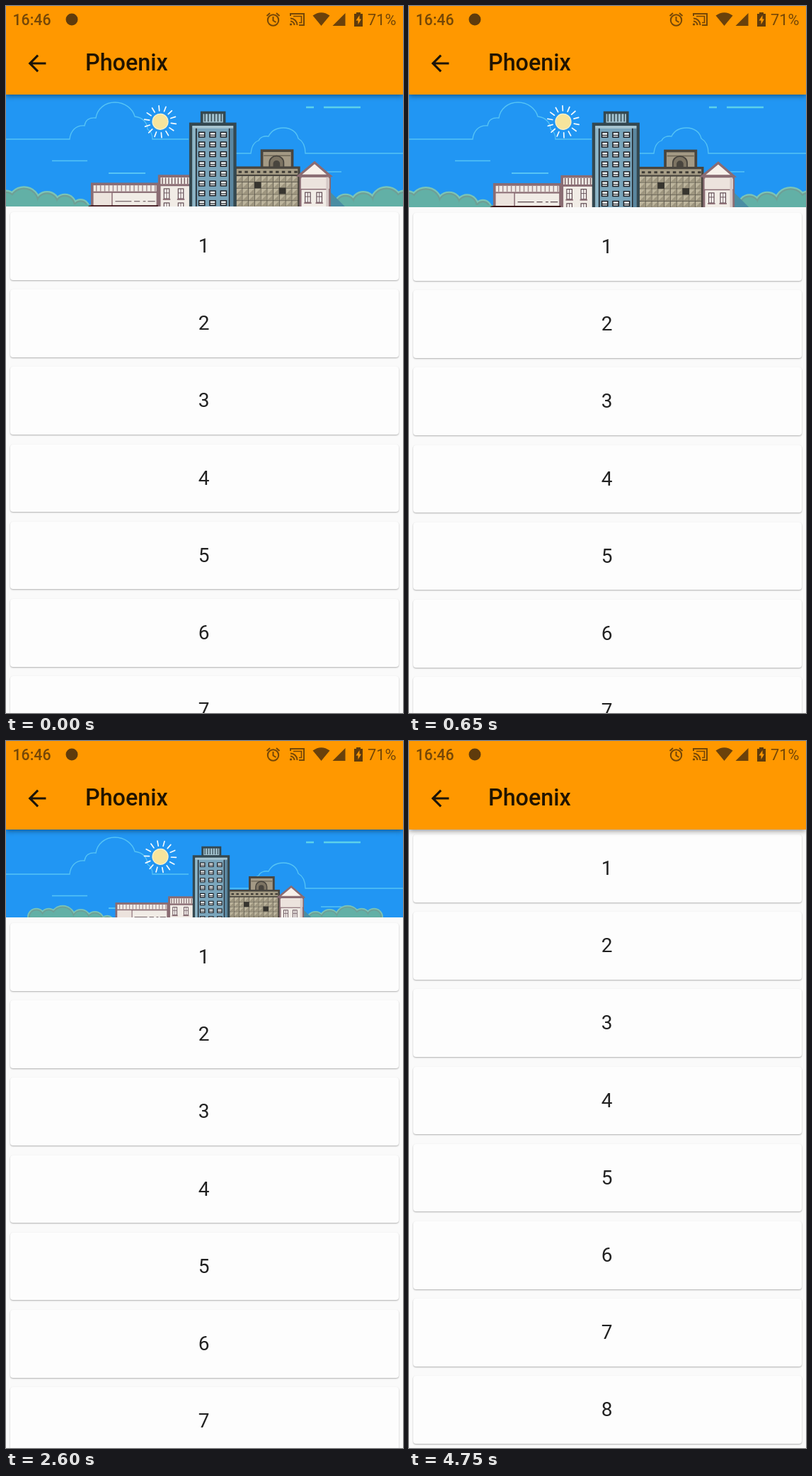
An HTML page for the animation above (5.7 s loop, 561 by 998 pixels).

```html
<!DOCTYPE html>
<html lang="en">
<head>
<meta charset="utf-8">
<title>Pull to refresh</title>
<style>
  html, body { margin: 0; width: 100%; height: 100%; overflow: hidden; background: #fafafa; }
  #stage { position: relative; width: 561px; height: 998px; overflow: hidden;
    font-family: Roboto, "Noto Sans", sans-serif; }
  #stage > * { position: absolute; left: 0; top: 0; }
  svg { display: block; }
  #list { top: 124px; width: 561px; height: 1000px; background: #fafafa; }
  .card { position: absolute; left: 6px; width: 549px; height: 95.5px; border-radius: 4px;
    background: #fdfdfd; box-shadow: 0 1px 2px rgba(0, 0, 0, .3);
    font-size: 28px; line-height: 95.5px; text-align: center; text-indent: -2px;
    color: rgba(0, 0, 0, .87); }
  #bar { width: 561px; height: 124.5px; background: #ff9800; box-shadow: 0 2px 7px rgba(0, 0, 0, .42); }
</style>
</head>
<body>
<div id="stage">
  <svg id="scene" width="561" height="400" viewBox="0 0 561 400">
    <rect width="561" height="400" fill="#2196f3"/>
    <g fill="none" stroke="#56c4f5" stroke-width="1.3">
      <path d="M0 188H90C91 177 98 168 111 169C112 161 118 157 127 158C129 145 140 136 154 136C168 136 179 145 182 156C193 157 200 165 200 174C205 177 207 182 207 188H258"/>
      <path d="M300 208H346C347 199 350 192 357 190C359 185 365 183 371 184C375 176 383 172 392 172C403 172 411 178 413 187C420 191 423 199 423 208H561"/>
      <path d="M65 218.5H115M320 229H356M445 234H474"/>
      <path d="M145 236H197" stroke-width="2"/>
      <path d="M424 143H435M449 143H501" stroke="#5cd0ea" stroke-width="2.4"/>
    </g>
    <g id="sun"></g>
    <g id="town"></g>
  </svg>
  <div id="list"></div>
  <div id="bar">
    <svg width="561" height="124" viewBox="0 0 561 124">
      <g fill="#754707">
        <text x="9.5" y="27" font-size="21.3" font-weight="500">16:46</text>
        <text x="511" y="27" font-size="21.8">71%</text>
        <circle cx="93" cy="19" r="8.5" fill="#5f3b0c"/>
        <path d="M445.500 28L433.500 13.500Q445.500 5 457.500 13.500Z" fill="#6a410b"/>
        <path d="M479.500 10V28H461.500Z" fill="#6a410b"/>
        <path d="M495 11V9H501V11H504V29H492V11Z" fill="#5f3b0c"/>
        <path d="M499.500 13L494.500 20.500H497.500V26L502 18.500H499.500Z" fill="#ff9800"/>
      </g>
      <g fill="none" stroke="#754707" stroke-width="2">
        <circle cx="377.500" cy="20" r="7.700"/>
        <path d="M377.500 15V20.500L381.500 23M368.500 14L373 10M386.500 14L382 10"/>
        <path d="M402 14V11H421V27H414M402 17.500A9.500 9.500 0 0 1 411.500 27M402 21.500A5.500 5.500 0 0 1 407.500 27"/>
        <path d="M406 14.500H417.500V23.500H414" stroke-width="1.600"/>
        <path d="M401 26H404" stroke-width="2.600"/>
      </g>
      <path transform="translate(25.300 62.300) scale(1.558)" fill="#1c1408"
        d="M20 11H7.830l5.590-5.590L12 4l-8 8 8 8 1.410-1.410L7.830 13H20z"/>
      <text x="112" y="91" font-size="32.300" font-weight="500" fill="rgba(0,0,0,.87)">Phoenix</text>
    </svg>
  </div>
</div>
<script>
const LOOP = 5700, STEP = 50, REST = 125;
const $ = id => document.getElementById(id);
const times = (n, fn) => Array.from({ length: n }, (_, i) => fn(i)).join('');
const rect = (x, y, w, h, fill, stroke = 'none', sw = 0) =>
  `<rect x="${x}" y="${y}" width="${w}" height="${h}" fill="${fill}" stroke="${stroke}" stroke-width="${sw}"/>`;
const path = (d, fill, stroke = 'none', sw = 0) =>
  `<path d="${d}" fill="${fill}" stroke="${stroke}" stroke-width="${sw}"/>`;

const MAUVE = '#8a6c73', CREAM = '#f1ece6', SLATE = '#344850', OLIVE = '#49453e', INK = '#1c1d22';

function bushes() {
  // x, y, radius for the left side; the right side is its mirror
  const balls = [[-128, 320, 22], [-98, 320, 22], [-64, 323, 32], [-20, 325, 25],
    [14, 328, 23], [44, 333, 18]];
  const ring = (fill, grow) => balls.map(([x, y, r]) =>
    `<circle cx="${x}" cy="${y}" r="${r + grow}" fill="${fill}"/>`).join('');
  const side = ring('#7cc5b6', 0) + ring('#6f9f95', -3) + ring('#62b0a6', -6) +
    rect(-144, 326, 219, 80, '#62b0a6');
  return `<g>${side}</g><g transform="translate(563 0) scale(-1 1)">${side}</g>`;
}

function sashWindow(x, y) {
  return rect(x, y, 10, 19, '#fbf6f2', '#5f4a52', 1.6) +
    path(`M${x} ${y + 8}H${x + 10}M${x + 5} ${y}V${y + 19}`, 'none', '#5f4a52', 1.2) +
    rect(x - 2, y + 19, 14, 2.5, MAUVE);
}

function shop() {
  return rect(66, 287, 125, 110, CREAM, MAUVE, 5) +
    rect(68, 301, 122, 3, MAUVE) +
    times(15, i => rect(73 + i * 8, 289, 2, 12, '#a58d90')) +
    rect(69, 304, 34, 28, '#ece3dd') +
    path('M104 303V330', 'none', MAUVE, 2) +
    path('M110 320H141M146 320H157M163 320H168M172 320H186', 'none', '#5a474d', 1.6) +
    path('M56 400V338Q56 329 66 329H192V400Z', '#b0504b', '#3a1016', 3.5);
}

function annex() {
  return rect(194, 272, 60, 130, CREAM, MAUVE, 5) +
    times(9, i => rect(199 + i * 6, 275, 2, 12, '#7b6066')) +
    rect(194, 287, 58, 4, MAUVE) +
    [203, 230].map(x => sashWindow(x, 296) + sashWindow(x, 323)).join('');
}

function tower() {
  const pane = (x, y) => rect(x, y, 11, 9, '#f4fafc', INK, 2) +
    rect(x, y + 4.5, 11, 1.6, INK);
  return rect(275, 151, 43, 22, '#a3c3d0', SLATE, 5) +
    times(6, i => rect(280 + i * 6.2, 153, 2, 15, SLATE)) +
    rect(254, 173, 84, 230, '#7aa5bb', SLATE, 6) +
    rect(257, 176, 78, 5, '#a9c6d1') +
    rect(257, 181, 5, 220, '#8fb5c6') + rect(329, 181, 6, 220, '#5b87a0') +
    path('M264.500 181V400M327.500 181V400', 'none', INK, 2) +
    times(11, row => times(3, col => pane(269.5 + col * 20.7, 188.5 + row * 18.6)));
}

function gridBlock() {
  const cell = (x, y) => path(`M${x} ${y}h10.500v10.500h-10.500z`, '#bdb59d') +
    path(`M${x + 10.5} ${y}v10.500h-10.500z`, '#9d957f');
  return rect(389.5, 223.5, 58, 34, '#a49a85', OLIVE, 5) +
    rect(393, 232, 51, 2, '#6d6555') +
    path('M404 256V246A13 12 0 0 1 431 246V256Z', '#7d7463', OLIVE, 2.5) +
    path('M411 256V248A6.500 6 0 0 1 424 248V256Z', OLIVE) +
    rect(341, 256, 119, 150, '#5d584c', OLIVE, 5) +
    rect(341, 258, 117, 12, '#a69d86') +
    times(10, i => rect(345 + i * 11.8, 262, 6, 4, '#3e3b35')) +
    rect(339, 269, 122, 3, OLIVE) +
    times(11, row => times(10, col => cell(341 + col * 11.8, 272 + row * 11.8))) +
    rect(375, 283, 13, 12, '#37352f') + rect(422, 294, 13, 12, '#37352f');
}

function gabled() {
  return path('M520 302L566 348H520Z', '#4a8da3') +
    rect(463, 272, 56, 130, CREAM, MAUVE, 4) +
    path('M460 271L490 246L519 271Z', '#f7f1eb', MAUVE, 4.5) +
    rect(461, 270, 60, 4, MAUVE) +
    rect(464, 276, 54, 20, '#ece3dd') +
    rect(464, 296, 54, 2, MAUVE) +
    sashWindow(472, 303) + sashWindow(494, 303) +
    rect(470, 330, 15, 60, '#b7a7ab') + sashWindow(494, 331) +
    rect(512, 274, 5, 126, '#d6c9c7');
}

$('town').innerHTML = bushes() + shop() + annex() + gridBlock() + gabled() + tower();
$('sun').innerHTML =
  times(14, i => `<path d="M0 -15.500V-22.500" stroke="#f4fbff" stroke-width="1.700" stroke-linecap="round" transform="rotate(${i * 360 / 14})"/>`) +
  '<circle r="11" fill="#f6e49c" stroke="#fbf3cf" stroke-width="1.200"/>';
$('list').innerHTML = times(9, i =>
  `<div class="card" style="top:${(8 + i * 109.2).toFixed(1)}px">${i + 1}</div>`);

// Drag down, settle at the resting offset, refresh, then collapse.
const RELEASE = 500, FIRST = 159, PEAK = 217, DONE = 2963;
const left = (t, from, span) => Math.pow(1 - Math.min(1, (t - from) / span), 4);

function pull(t) {
  if (t < RELEASE) return PEAK - (PEAK - FIRST) * Math.pow(1 - t / RELEASE, 2);
  if (t < DONE) return REST + (PEAK - REST) * left(t, RELEASE, 700);
  return REST * left(t, DONE, 500);
}

function draw(t) {
  const offset = Math.round(pull(t));
  const zoom = Math.max(offset, REST) / 214.5;
  const shown = Math.min(1, offset / REST);
  const spin = t < RELEASE ? 360 * offset / REST : -0.36 * (Math.min(t, DONE) - RELEASE);
  $('list').style.transform = `translateY(${offset}px)`;
  $('town').setAttribute('transform', `translate(281.5 149) scale(${zoom}) translate(-281.5 -149)`);
  $('sun').setAttribute('transform', `translate(218 ${163.3 + 4 * (1 - shown)}) rotate(${spin})`);
}

const start = performance.now();
function tick() {
  const t = (performance.now() - start) % LOOP;
  draw(Math.floor(t / STEP) * STEP);
  requestAnimationFrame(tick);
}
draw(0);
requestAnimationFrame(tick);
</script>
</body>
</html>
```
